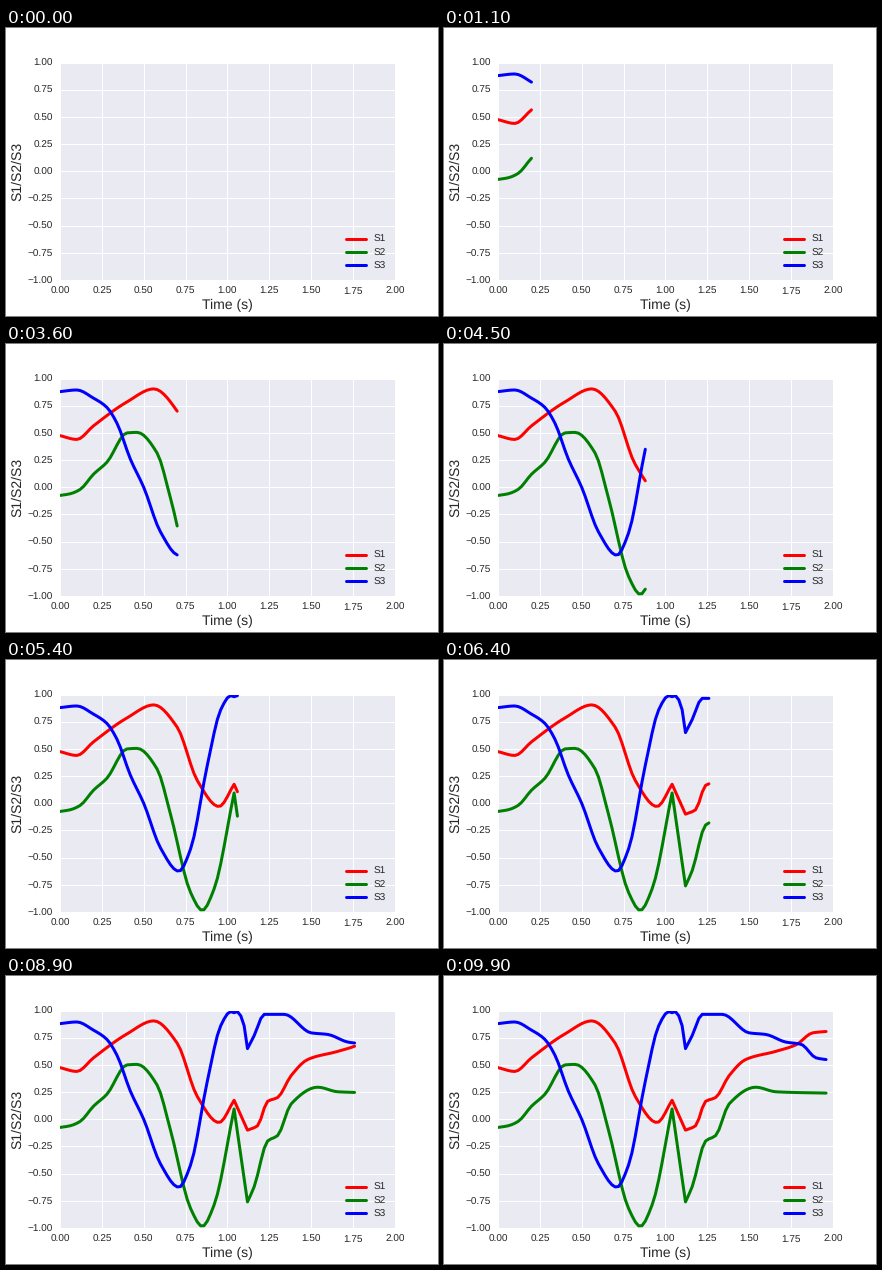
A matplotlib script that plays this animation: 432x288 px, repeating every 10000 ms.

```python
from itertools import pairwise

import numpy as np
import matplotlib.pyplot as plt
from matplotlib.animation import FuncAnimation

FRAMES, DT = 100, 0.02
BREAKS = (0, 1.04, 1.12, 2)  # the signals turn sharply at the inner times
INK = "0.15"

plt.rcParams.update({
    "font.family": "Liberation Sans",
    "font.size": 10,
    "text.hinting": "none",
    "axes.facecolor": "#EAEAF2",
    "axes.linewidth": 0,
    "axes.axisbelow": True,
    "axes.grid": True,
    "axes.labelcolor": INK,
    "axes.labelsize": 14,
    "text.color": INK,
    "grid.color": "white",
    "grid.linestyle": "-",
    "grid.linewidth": 1,
    "lines.linewidth": 3,
    "lines.solid_capstyle": "round",
    "xtick.color": INK,
    "ytick.color": INK,
    "xtick.major.size": 0,
    "ytick.major.size": 0,
    "xtick.major.pad": 7,
    "ytick.major.pad": 7,
    "legend.frameon": False,
    "legend.labelspacing": 0.4,
})

t = np.arange(FRAMES) * DT


def monotone(x, y, s):
    """Cubic through the points that never overshoots them."""
    h, d = np.diff(x), np.diff(y) / np.diff(x)
    m = np.zeros_like(y)
    m[0], m[-1] = d[0], d[-1]
    for i in range(1, len(y) - 1):
        if d[i - 1] * d[i] > 0:
            a, b = 2 * h[i] + h[i - 1], h[i] + 2 * h[i - 1]
            m[i] = (a + b) / (a / d[i - 1] + b / d[i])
    j = np.clip(np.searchsorted(x, s, "right") - 1, 0, len(h) - 1)
    u = (s - x[j]) / h[j]
    rise = u * u * (3 - 2 * u)
    bend = u * (1 - u) * ((1 - u) * m[j] - u * m[j + 1])
    return y[j] + rise * (y[j + 1] - y[j]) + h[j] * bend


def signal(*points):
    """Smooth curve through key points, with corners at the breaks."""
    x, y = np.array(points, float).T
    out = np.zeros(FRAMES)
    for a, b in pairwise(BREAKS):
        key = (x >= a) & (x <= b)
        now = (t >= a) & (t <= b)
        out[now] = monotone(x[key], y[key], t[now])
    return out


s1 = signal((0, .475), (.1, .44), (.2, .565), (.4, .785), (.56, .905),
            (.7, .7), (.82, .21), (.95, -.03), (1.04, .175), (1.12, -.1),
            (1.18, -.06), (1.24, .165), (1.3, .2), (1.38, .4), (1.48, .55),
            (1.66, .625), (1.78, .685), (1.88, .795), (1.98, .81))

s2 = signal((0, -.075), (.06, -.06), (.12, -.02), (.2, .12), (.28, .23),
            (.4, .5), (.46, .505), (.58, .315), (.66, -.1), (.78, -.82),
            (.85, -.985), (.92, -.79), (1.04, .095), (1.12, -.76),
            (1.16, -.62), (1.24, -.2), (1.3, -.15), (1.38, .14),
            (1.54, .295), (1.66, .253), (1.98, .24))

s3 = signal((0, .88), (.1, .895), (.2, .82), (.28, .735), (.34, .59),
            (.42, .26), (.5, 0), (.6, -.41), (.71, -.625), (.78, -.42),
            (.88, .35), (.96, .86), (1.02, .99), (1.04, .98), (1.06, .99),
            (1.1, .86), (1.12, .65), (1.16, .77), (1.22, .965), (1.34, .965),
            (1.5, .795), (1.6, .78), (1.72, .71), (1.81, .69), (1.9, .565),
            (1.98, .545))

fig, ax = plt.subplots(figsize=(6, 4), dpi=72, facecolor="white")
fig.subplots_adjust(left=.125, right=.9, bottom=.125, top=.88)
ax.set(xlim=(0, 2), ylim=(-1, 1),
       xticks=np.arange(0, 2.01, .25), yticks=np.arange(-1, 1.01, .25))
ax.set_xlabel("Time (s)", labelpad=3)
ax.set_ylabel("S1/S2/S3")

series = {"S1": (s1, "red"), "S2": (s2, "green"), "S3": (s3, "blue")}
lines = {name: ax.plot([], [], color=color, label=name)[0]
         for name, (_, color) in series.items()}
ax.legend(loc="lower right")


def update(i):
    n = i if i > 1 else 0
    for name, (y, _) in series.items():
        lines[name].set_data(t[:n], y[:n])
    return list(lines.values())


anim = FuncAnimation(fig, update, frames=FRAMES, interval=100, repeat=True)
plt.show()
```
